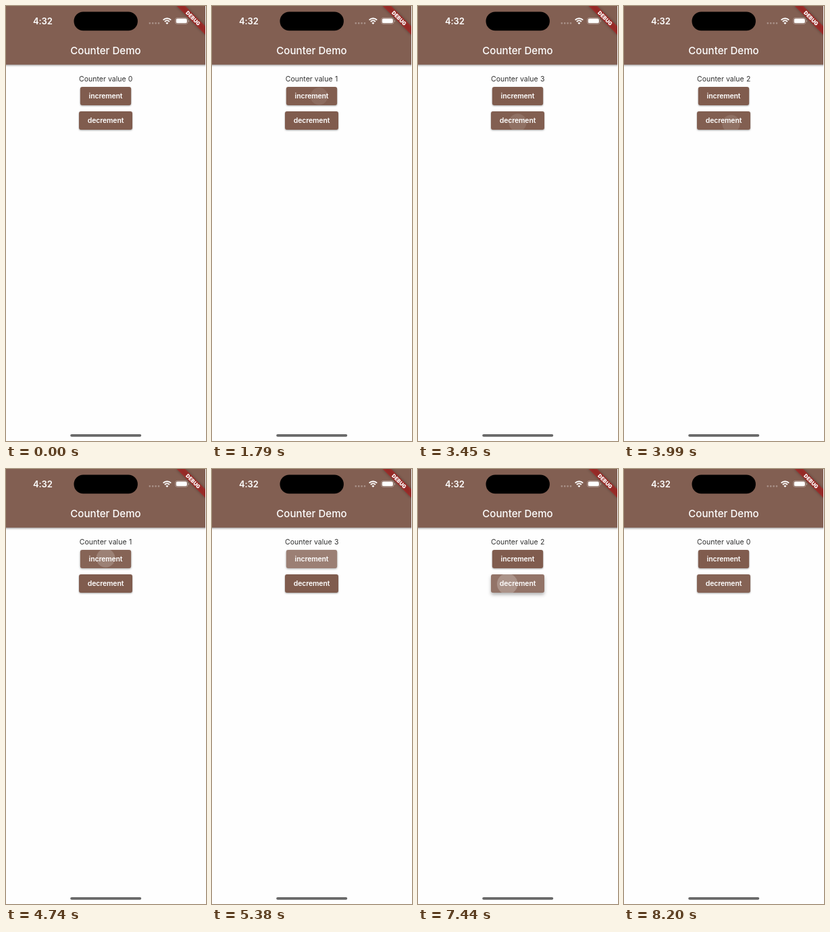
Write an HTML page that moves like this. It is 296 by 640 pixels and loops after 8300 ms.

```html
<!DOCTYPE html>
<html lang="en">
<head>
<meta charset="utf-8">
<title>Counter Demo</title>
<style>
  html, body { margin: 0; width: 100%; height: 100%; overflow: hidden; background: #fefefe; }
  svg { display: block; width: 295px; height: 640px; font-family: Inter, Roboto, sans-serif; }
  .bar { fill: #825f52; filter: drop-shadow(0 1.6px 1.8px rgba(0, 0, 0, .4)); }
  .face { fill: #805c4e; }
  .caption { fill: #fff; font-size: 10.5px; font-weight: 600; letter-spacing: -.15px; text-anchor: middle; }
  .value { fill: #303030; font-size: 10.5px; letter-spacing: .03px; }
  .title { fill: #fff; font-size: 15px; font-weight: 500; letter-spacing: .06px; text-anchor: middle; }
  .clock { fill: #fff; font-size: 13px; font-weight: 600; letter-spacing: -.1px; }
  .ribbon { fill: rgba(183, 28, 28, .63); filter: drop-shadow(0 0 2px rgba(0, 0, 0, .5)); }
  .debug { fill: #fff; font-size: 7.65px; font-weight: 900; text-anchor: middle; }
  .signal { stroke: #fff; stroke-opacity: .32; stroke-width: 2.7; stroke-linecap: round; stroke-dasharray: 0 4.4; }
  .arc { fill: none; stroke: #fff; stroke-width: 1.9; }
</style>
</head>
<body>
<svg viewBox="0 0 295 640">
  <rect class="bar" x="-6" y="-6" width="307" height="92.3"/>

  <text class="clock" x="40" y="26.6">4:32</text>
  <rect x="100.5" y="8.5" width="94.4" height="27.8" rx="13.9"/>
  <path class="signal" d="M212.8 25.3h13.4"/>
  <path class="arc" d="M232.6 20.6a8.2 8.2 0 0 1 11.6 0M234.9 23a5 5 0 0 1 7 0"/>
  <path fill="#fff" d="M238.4 27l-2-2.1a2.9 2.9 0 0 1 4 0z"/>
  <rect x="250.6" y="17.4" width="18.4" height="9" rx="2.8" fill="none" stroke="#fff" stroke-opacity=".4" stroke-width=".8"/>
  <rect x="251.8" y="18.6" width="16" height="6.6" rx="1.8" fill="#fff"/>
  <path fill="#fff" fill-opacity=".45" d="M270 20.4q1.2.5 1.2 1.5t-1.2 1.5z"/>

  <text class="title" x="147.5" y="70.8">Counter Demo</text>
  <text class="value" id="label" y="111">Counter value</text>
  <text class="value" id="digit" x="184.2" y="111" text-anchor="middle">0</text>
  <g id="buttons"></g>

  <g transform="translate(295 0) rotate(45)">
    <rect class="ribbon" x="-30" y="21" width="60" height="9"/>
    <text class="debug" y="28.3">DEBUG</text>
  </g>
  <rect x="95.2" y="629.9" width="105" height="3.8" rx="1.9" fill="#686868"/>
</svg>
<script>
const LOOP = 8300;
const REFRESH = 106;
const HOLD = 150;
const FADE = 500;
const MID = 147.5;

// Runs of taps; the first finger lands "lead" ms before the screen refreshes
const bursts = [
  { id: 0, start: 1350, lead: 135, gap: 535, count: 3 },
  { id: 1, start: 3450, lead: 30, gap: 530, count: 2 },
  { id: 0, start: 4740, lead: 50, gap: 426, count: 3 },
  { id: 1, start: 6570, lead: 90, gap: 400, count: 4 }
];

const taps = bursts.flatMap(({ id, start, lead, gap, count }) =>
  Array.from({ length: count }, (_, i) => {
    const down = start - lead + i * gap;
    const drift = 15.3 * Math.sin(2.34 * i);
    return {
      id, start, down, up: down + HOLD,
      x: MID + drift,
      y: 131 + 40.5 * id + .16 * drift
    };
  }));

const clamp = v => Math.min(1, Math.max(0, v));

function make(tag, attrs, parent) {
  const node = document.createElementNS("http://www.w3.org/2000/svg", tag);
  for (const k in attrs) node.setAttribute(k, attrs[k]);
  return parent.appendChild(node);
}

function makeButton(name, y, width) {
  const root = document.getElementById("buttons");
  const box = { x: MID - width / 2, y, width, height: 27, rx: 3 };
  const face = make("rect", { ...box, class: "face" }, root);
  const clip = make("clipPath", { id: name }, root);
  make("rect", box, clip);
  const glow = make("rect", { ...box, fill: "#fff" }, root);
  const ripple = make("circle", { fill: "#fff", "clip-path": `url(#${name})` }, root);
  make("text", { class: "caption", x: MID, y: y + 17 }, root).textContent = name;
  return { face, glow, ripple };
}

const buttons = [
  makeButton("increment", 118.9, 75.3),
  makeButton("decrement", 154.9, 79)
];
const label = document.getElementById("label");
const digit = document.getElementById("digit");

function press(tap, t) {
  if (!tap) return { glow: 0, ripple: 0, r: 0, lift: 0 };
  const held = Math.min(t - tap.down, HOLD);
  const after = Math.max(0, t - tap.up);
  const grow = clamp(held / 90);
  const fade = (1 - clamp(after / FADE)) ** 2;
  return {
    glow: .15 * grow ** 2 * fade,
    ripple: .22 * clamp(held / 60) * fade,
    r: 12 + 3.3 * grow + after * .6,
    lift: grow ** 2 * (1 - clamp(after / 200))
  };
}

function drawButton({ face, glow, ripple }, tap, t) {
  const { lift, r, ...alpha } = press(tap, t);
  face.style.filter =
    `drop-shadow(0 ${1 + 2 * lift}px ${1 + 1.6 * lift}px rgba(0,0,0,${.36 - .06 * lift}))`;
  glow.setAttribute("opacity", alpha.glow);
  ripple.setAttribute("opacity", alpha.ripple);
  ripple.setAttribute("r", r);
  ripple.setAttribute("cx", tap ? tap.x : 0);
  ripple.setAttribute("cy", tap ? tap.y : 0);
}

// The screen refreshes in even steps, counted from the start of each run
function refreshTime(t) {
  const burst = bursts.findLast(b => b.start <= t);
  return burst ? t - (t - burst.start) % REFRESH : 0;
}

function draw(t) {
  const done = taps.filter(tap => Math.max(tap.start, tap.down) <= t);
  buttons.forEach((b, id) => drawButton(b, done.findLast(tap => tap.id === id), t));
  const count = done.reduce((n, tap) => tap.up <= t ? n + (tap.id ? -1 : 1) : n, 0);
  digit.textContent = count;
  label.setAttribute("x", count === 1 ? 108.8 : 108);
}

const start = performance.now();
function loop(now) {
  draw(refreshTime(Math.max(0, now - start) % LOOP));
  requestAnimationFrame(loop);
}
draw(0);
requestAnimationFrame(loop);
</script>
</body>
</html>
```
